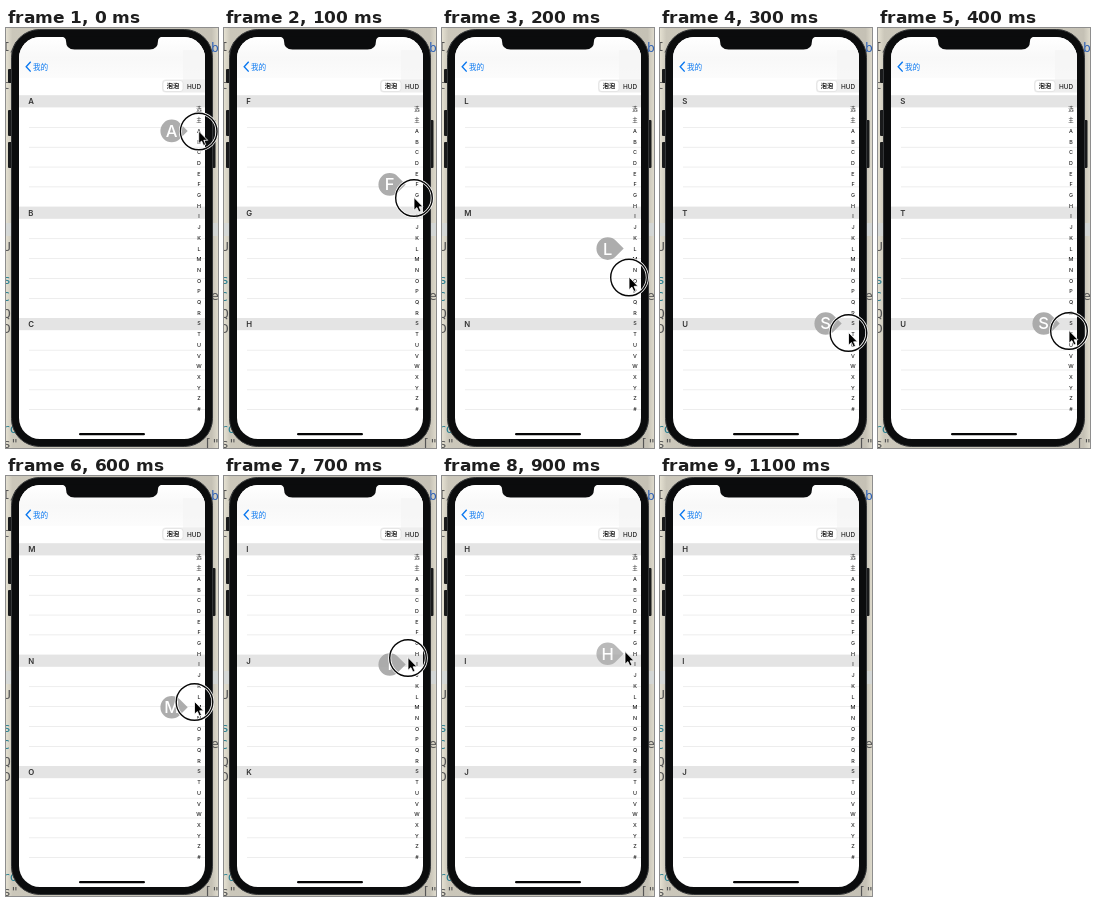
Animation, 212 px wide and 420 px high, one loop 1.2 s. Source, as an HTML page:

```html
<!DOCTYPE html>
<html lang="zh">
<head>
<meta charset="utf-8">
<title>Section index</title>
<style>
html, body { margin: 0; width: 100%; height: 100%; overflow: hidden; background: #dfdbcd; }
svg { display: block; width: 212px; height: 420px; }
text { font-family: Inter, "Noto Sans CJK SC", "Noto Sans CJK", sans-serif; }
.code text { font-family: "DejaVu Sans Mono", "Noto Sans Mono", monospace; font-size: 13px; fill: #555; }
.code .key { fill: #2f62b5; }
.code .type { fill: #287f91; }
.mid { text-anchor: middle; }
.index { font-size: 5.4px; font-weight: 500; fill: #222; }
.title { font-size: 7.8px; font-weight: 600; fill: #333; }
</style>
</head>
<body>
<svg viewBox="0 0 212 420">
  <defs>
    <linearGradient id="shade">
      <stop offset="0" stop-color="#e4e0d1"/>
      <stop offset=".03" stop-color="#cbc7ba"/>
      <stop offset=".97" stop-color="#c5c1b5"/>
      <stop offset="1" stop-color="#dedacc"/>
    </linearGradient>
    <linearGradient id="nav" x2="0" y2="1">
      <stop offset="0" stop-color="#fff"/>
      <stop offset=".5" stop-color="#f8f8f8"/>
      <stop offset="1" stop-color="#fcfcfc"/>
    </linearGradient>
    <clipPath id="screen"><rect x="13" y="9" width="186" height="402" rx="21"/></clipPath>
  </defs>

  <rect width="212" height="420" fill="url(#shade)"/>
  <rect y="195" width="212" height="13" fill="#d3d9dd" opacity=".7"/>
  <g class="code">
    <text x="-4" y="23">I/</text>
    <text x="-4" y="61">t</text>
    <text x="-3" y="223">U</text>
    <text x="-3" y="256" class="type">s</text>
    <text x="-4" y="273" class="type">C</text>
    <text x="-3" y="290">Q</text>
    <text x="-3" y="305">D</text>
    <text x="-4" y="405" class="type">ro</text>
    <text x="-3" y="420">s"</text>
    <text x="205" y="24" class="key">b</text>
    <text x="205" y="272">e</text>
    <text x="198" y="420">["</text>
  </g>

  <g fill="#191a1b">
    <rect x="2" y="41" width="5" height="14" rx="1"/>
    <rect x="2" y="82" width="5" height="26" rx="1"/>
    <rect x="2" y="114" width="5" height="26" rx="1"/>
    <rect x="205" y="92" width="4.5" height="48" rx="1"/>
  </g>
  <rect x="5.5" y="1.5" width="201" height="417" rx="28" fill="#0b0c0d" stroke="#343638"/>

  <g clip-path="url(#screen)">
    <rect x="13" y="9" width="186" height="402" fill="#fff"/>
    <rect x="13" y="9" width="186" height="41" fill="url(#nav)"/>
    <rect x="177" y="22" width="22" height="30" fill="#f5f5f5" opacity=".7"/>
    <path d="M24.7 33.8 20.2 38.7 24.7 43.6" fill="none" stroke="#0a78f0" stroke-width="1.4"/>
    <text x="27" y="41.6" font-size="7.6" fill="#0a78f0">我的</text>
    <rect x="156" y="51.5" width="50" height="13" rx="3.5" fill="#eee"/>
    <rect x="157" y="52.4" width="20" height="11.2" rx="3" fill="#fff" stroke="#d8d8d8" stroke-width=".6"/>
    <text class="mid" x="167" y="60.4" font-size="6.2" font-weight="700" fill="#111">泡泡</text>
    <text class="mid" x="188" y="60.5" font-size="6.4" font-weight="500" fill="#222">HUD</text>
    <g id="list"></g>
    <g id="index"></g>
    <rect x="73" y="405" width="66" height="2.3" rx="1.15" fill="#050505"/>
  </g>
  <path d="M55 8.5Q60 9 60 13Q60 21.5 68.5 21.5H143.5Q152 21.5 152 13Q152 9 157 8.5Z" fill="#0b0c0d"/>

  <g id="bubble">
    <path d="M8 -8A11.3 11.3 0 1 0 8 8L16 0Z" fill="#a6a6a6" opacity=".92"/>
    <text id="mark" class="mid" y="5.9" font-size="16.5" font-weight="500" fill="#fff"></text>
  </g>
  <g id="pointer">
    <g id="ring" fill="none">
      <circle r="18.3" stroke="#fff" stroke-width="3"/>
      <circle r="18.3" stroke="#080808" stroke-width="1.4"/>
    </g>
    <path d="M0 -.5V12.2L2.9 9.6 4.9 14 7 13.1 5.1 8.8H9Z" fill="#000" stroke="#fff" stroke-width=".8"/>
  </g>
</svg>
<script>
const $ = id => document.getElementById(id);
const STEP = 100;
const labels = ["选", "主", ..."ABCDEFGHIJKLMNOPQRSTUVWXYZ", "#"];
const rowY = i => 81.5 + i * 10.7;

// letter, bubble opacity, pointer x, pointer y, pressed
const steps = [
  ["A", 1, 192.7, 103.5, 1],
  ["F", 1, 190, 170, 1],
  ["L", 1, 187, 249.5, 1],
  ["S", 1, 188.5, 305, 1],
  ["S", 1, 191, 303, 1],
  ["R", 1, 192.8, 277, 1],
  ["M", 1, 188.5, 226, 1],
  ["I", 1, 184, 182, 1],
  ["H", 1, 183.2, 177, 0],
  ["H", .85, 183, 176, 0],
  ["H", .25, 183, 176, 0],
  ["H", 0, null, null, 0]
];

function add(parent, tag, attrs, text = "") {
  const el = document.createElementNS("http://www.w3.org/2000/svg", tag);
  for (const key in attrs) el.setAttribute(key, attrs[key]);
  el.textContent = text;
  parent.append(el);
  return el;
}

const titles = [0, 1, 2].map(n => {
  const top = 67.2 + n * 111.4;
  add($("list"), "rect", { x: 13, y: top, width: 186, height: 12.2, fill: "#e4e4e4" });
  for (let r = 1; r < 5; r++)
    add($("list"), "rect", { x: 23, y: top + 12 + r * 19.85, width: 176, height: .6, fill: "#e2e2e2" });
  return add($("list"), "text", { class: "title", x: 22.3, y: top + 9 });
});

labels.forEach((label, i) =>
  add($("index"), "text", { class: "index mid", x: 193, y: rowY(i) + 1.9 }, label));

const place = (el, x, y) => el.setAttribute("transform", `translate(${x} ${y})`);
const show = (el, on) => el.setAttribute("visibility", on ? "visible" : "hidden");
let last = -1;

function draw(now) {
  const n = Math.floor(now / STEP) % steps.length;
  if (n !== last) {
    last = n;
    const [letter, alpha, x, y, pressed] = steps[n];
    const row = labels.indexOf(letter);
    titles.forEach((title, i) => title.textContent = labels[row + i]);
    $("mark").textContent = letter;
    $("bubble").setAttribute("opacity", alpha);
    place($("bubble"), 165.7, rowY(row));
    show($("pointer"), x !== null);
    if (x !== null) place($("pointer"), x, y);
    $("ring").setAttribute("opacity", pressed);
  }
}

const start = performance.now();
function tick() {
  draw(performance.now() - start);
  requestAnimationFrame(tick);
}
tick();
</script>
</body>
</html>
```
